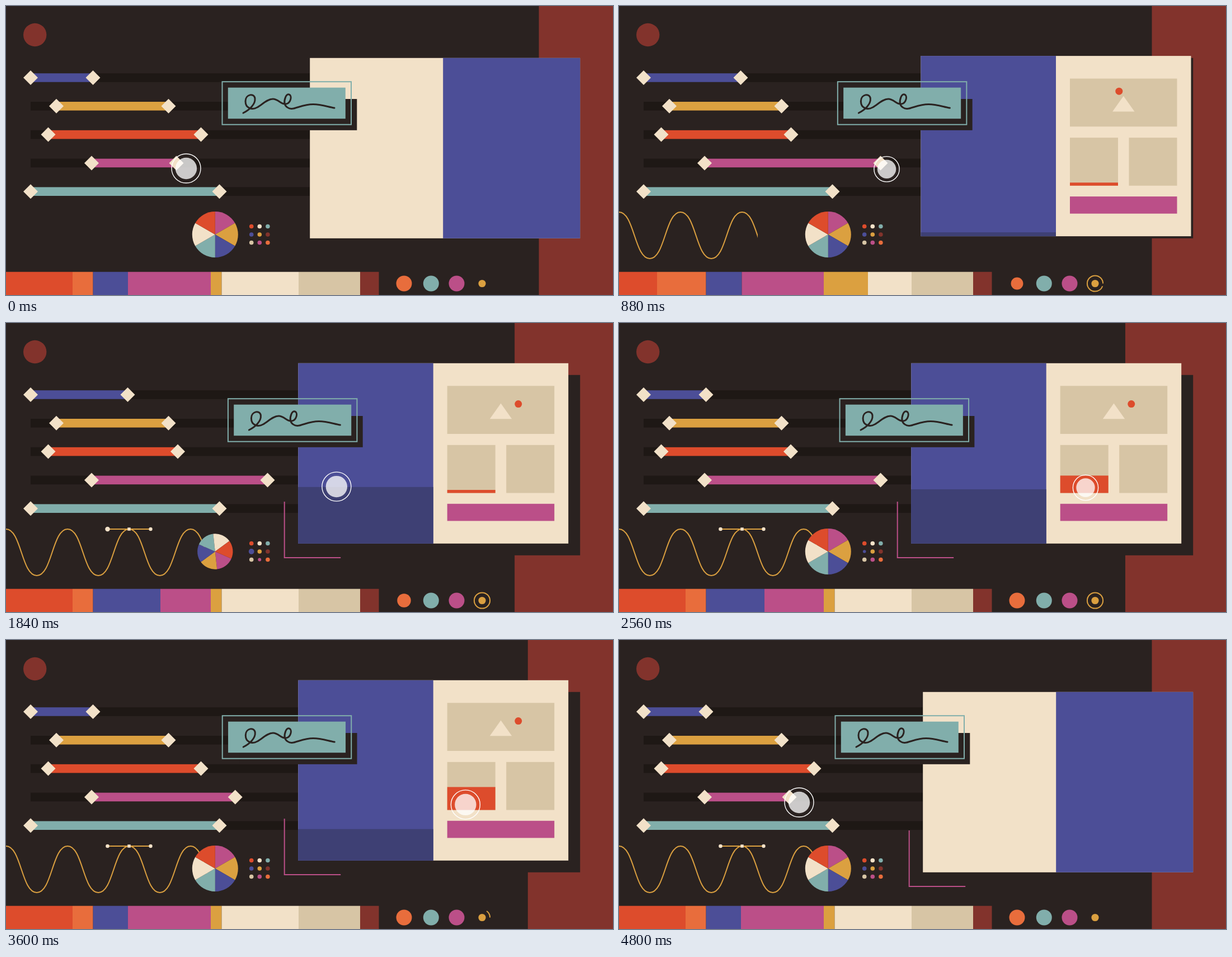
Recreate the animation shown at these times as an HTML page with a canvas. Size 1085 by 516 pixels, loop 4.88 s.

```html
<!DOCTYPE html>
<html lang="en">
<head>
<meta charset="utf-8">
<title>Interface composition</title>
<style>
  html, body { margin: 0; width: 100%; height: 100%; overflow: hidden; background: #2a2220; }
  canvas { display: block; width: 1085px; height: 516px; }
</style>
</head>
<body>
<canvas id="stage" width="1085" height="516"></canvas>
<script>
const LOOP = 4880;
const TAU = 2 * Math.PI;
const ctx = document.getElementById('stage').getContext('2d');
const C = {
  dark: '#2a2220', track: '#1e1815', maroon: '#82332c', blue: '#4c4e97', shade: '#3e4074',
  mustard: '#dba040', red: '#dd4c2c', magenta: '#bb4f88', teal: '#81aeab',
  cream: '#f2e1c8', tan: '#d7c5a5', orange: '#e86d3c'
};

let t = 0;

// Eased progress from 0 to 1, beginning at a given time.
function go(start, length) {
  const p = Math.min(Math.max((t - start) / length, 0), 1);
  return p * p * (3 - 2 * p);
}

// Eased progress from 0 to 1 and later back to 0.
const trip = (out, back, outLength, backLength = outLength) =>
  go(out, outLength) - go(back, backLength);

function rect(color, x, y, w, h) {
  ctx.fillStyle = color;
  ctx.fillRect(x, y, w, h);
}

function disc(color, x, y, r) {
  ctx.fillStyle = color;
  ctx.beginPath();
  ctx.arc(x, y, r, 0, TAU);
  ctx.fill();
}

function polygon(color, ...points) {
  ctx.fillStyle = color;
  ctx.beginPath();
  points.forEach(([x, y]) => ctx.lineTo(x, y));
  ctx.fill();
}

function line(color, width, path) {
  ctx.strokeStyle = color;
  ctx.lineWidth = width;
  ctx.stroke(path);
}

function arc(color, width, x, y, r, turn) {
  const path = new Path2D();
  path.arc(x, y, r, 0, -TAU * turn, true);
  line(color, width, path);
}

function scoped(draw) {
  ctx.save();
  draw();
  ctx.restore();
}

const diamond = (x, y) => polygon(C.cream, [x - 13, y], [x, y - 13], [x + 13, y], [x, y + 13]);

function drawSlider(row, color, from, to) {
  const y = 128 + 50.8 * row;
  rect(C.track, 44, y - 7.8, 505, 15.6);
  rect(color, from, y - 7.8, to - from, 15.6);
  diamond(from, y);
  diamond(to, y);
}

function drawSliders() {
  drawSlider(0, C.blue, 44, 155.5 + 62 * trip(0, 2160, 720, 380));
  drawSlider(1, C.mustard, 90, 290.5);
  drawSlider(2, C.red, 75.5, 348.5 - 41.5 * trip(160, 2800, 770, 560));
  drawSlider(3, C.magenta, 153, 304.5 + 163 * trip(80, 3376, 800, 560));
  drawSlider(4, C.teal, 44, 381.5);
}

function drawWave() {
  const [half, top, bottom] = [55, 368, 451];
  const path = new Path2D();
  path.moveTo(0, top);
  for (let i = 0; i < 7; i++) {
    const [y0, y1] = i % 2 ? [bottom, top] : [top, bottom];
    const middle = (i + .5) * half;
    path.bezierCurveTo(middle, y0, middle, y1, (i + 1) * half, y1);
  }
  scoped(() => {
    ctx.beginPath();
    ctx.rect(0, 360, 360 * go(120, 1210), 100);
    ctx.clip();
    line(C.mustard, 2, path);
  });
}

function drawHandle() {
  const reach = 38.5 * go(1300, 340);
  const size = 5.5 * go(1200, 160);
  rect(C.mustard, 220 - reach, 367, reach * 2, 2);
  disc(C.cream, 220 - reach, 368, 4.3 * go(1600, 200) - go(1800, 280));
  disc(C.cream, 220 + reach, 368, 3.2 * go(1600, 240));
  rect(C.cream, 220 - size / 2, 368 - size / 2, size, size);
}

function drawPie() {
  const colors = [C.magenta, C.mustard, C.blue, C.teal, C.cream, C.red];
  const slice = TAU / colors.length;
  const start = TAU * (go(1530, 830) - .25);
  const radius = 41 * (1 - .27 * trip(1530, 1945, 415));
  colors.forEach((color, i) => {
    ctx.fillStyle = color;
    ctx.beginPath();
    ctx.moveTo(373.8, 408);
    ctx.arc(373.8, 408, radius, start + i * slice, start + (i + 1) * slice);
    ctx.fill();
  });
}

function drawDotGrid() {
  const colors = [C.red, C.cream, C.teal, C.blue, C.mustard, C.maroon, C.tan, C.magenta, C.orange];
  const growth = {
    [C.blue]: 1.1 * trip(1560, 1960, 280) - trip(2200, 2560, 320),
    [C.magenta]: -.9 * trip(1560, 1840, 280)
  };
  colors.forEach((color, i) =>
    disc(color, 438.7 + i % 3 * 14.6, 393.5 + Math.floor(i / 3) * 14.5, 3.8 + (growth[color] || 0)));
}

function drawPalette() {
  const squeeze = trip(0, 880, 880, 760);
  const colors = [C.red, C.orange, C.blue, C.magenta, C.mustard, C.cream, C.tan, C.maroon];
  const edges = [0, 119 - 51 * squeeze, 155.6, 218 + 58 * trip(800, 2350, 840, 610), 366,
    385.5 + 59.5 * squeeze, 523, 633, 666.5];
  colors.forEach((color, i) => rect(color, edges[i], 474.7, edges[i + 1] - edges[i], 42));

  disc(C.orange, 711.5, 495.5, 14 - 4 * trip(0, 1280, 1280, 1040));
  disc(C.teal, 759.8, 495.5, 14);
  disc(C.magenta, 805.5, 495.5, 14);
  disc(C.mustard, 851, 495.5, 6.6);
  arc(C.mustard, 2, 851, 495.5, 14.1, trip(160, 2960, 840, 850));
}

function drawPage() {
  rect(C.cream, 0, 0, 483, 322);
  rect(C.tan, 266.5, 40.5, 191.5, 85.7);
  polygon(C.cream, [362.3, 71.7], [342.6, 99.5], [382, 99.5]);
  const angle = 1.85 * (go(640, 720) - .5);
  disc(C.red, 368 + 32 * Math.sin(angle), 92 - 32 * Math.cos(angle), 6.5);
  for (const x of [266.5, 372]) rect(C.tan, x, 146, 86, 85.7);
  const fill = 5.5 + 35.5 * trip(2320, 4400, 370, 80);
  rect(C.red, 266.5, 231.7 - fill, 86, fill);
  rect(C.magenta, 266.5, 251, 191.5, 30.6);
}

function drawCover() {
  const left = 238 * (1 - trip(80, 4240, 360, 520));
  const right = 483 - 241.5 * trip(200, 3880, 560, 486);
  const strip = 101 * trip(720, 3600, 1000, 400) * (1 - .45 * go(2300, 1400));
  rect(C.blue, left, 0, right - left, 322);
  rect(C.shade, 0, 322 - strip, 241.5, strip);
}

function drawCorner() {
  const drawn = 201 * go(1220, 420);
  if (!drawn) return;
  ctx.setLineDash([drawn, 400]);
  line(C.magenta, 2, new Path2D('M-24.5 247.3V347.3H76'));
}

function drawCard() {
  const lift = 21 * trip(750, 4080, 490, 560);
  rect(C.dark, 543.2, 92.8, 483, 322);
  scoped(() => {
    ctx.translate(543.2 - lift, 92.8 - lift);
    drawPage();
    drawCover();
    drawCorner();
  });
}

const signature = new Path2D(
  'M424 191C436 185 446 175 445 165S428 157 428 170S440 186 449 181S467 166 477 166' +
  'S491 176 500 175S512 160 506 158S497 169 498 174S505 185 514 183S534 175.5 549 175.5S575 180 587 182');

function drawLabel() {
  scoped(() => {
    ctx.translate(10.6 * trip(0, 2000, 2000, 1760), 0);
    rect(C.dark, 417, 166, 210.3, 55.8);
    rect(C.teal, 396.8, 145.7, 210, 55.5);
    ctx.strokeStyle = C.teal;
    ctx.lineWidth = 2;
    ctx.strokeRect(386.5, 135.2, 230.5, 76.5);
    ctx.lineCap = ctx.lineJoin = 'round';
    line(C.dark, 3, signature);
  });
}

function drawCursor() {
  const x = 322 + 156.5 * go(80, 800) + 355.5 * go(1530, 830) - 512 * go(3504, 1036);
  const y = 290 + (x - 322) / 128;
  const scale = 1 - .13 * (trip(0, 960, 200) + trip(2300, 2720, 200));
  disc('rgba(255,255,255,.76)', x, y, 19.2 * scale);
  arc('#fff', 1.4, x, y, 26 * scale, 1);
}

function frame(now) {
  t = now % LOOP;
  const band = 952.5 - 47.5 * trip(1620, 3445, 270, 280);
  rect(C.dark, 0, 0, 1085, 516);
  rect(C.maroon, band, 0, 1085 - band, 516);
  disc(C.maroon, 51.7, 51.5, 20.7);
  drawSliders();
  drawWave();
  drawHandle();
  drawPie();
  drawDotGrid();
  drawPalette();
  drawCard();
  drawLabel();
  drawCursor();
  requestAnimationFrame(frame);
}
requestAnimationFrame(frame);
</script>
</body>
</html>
```
